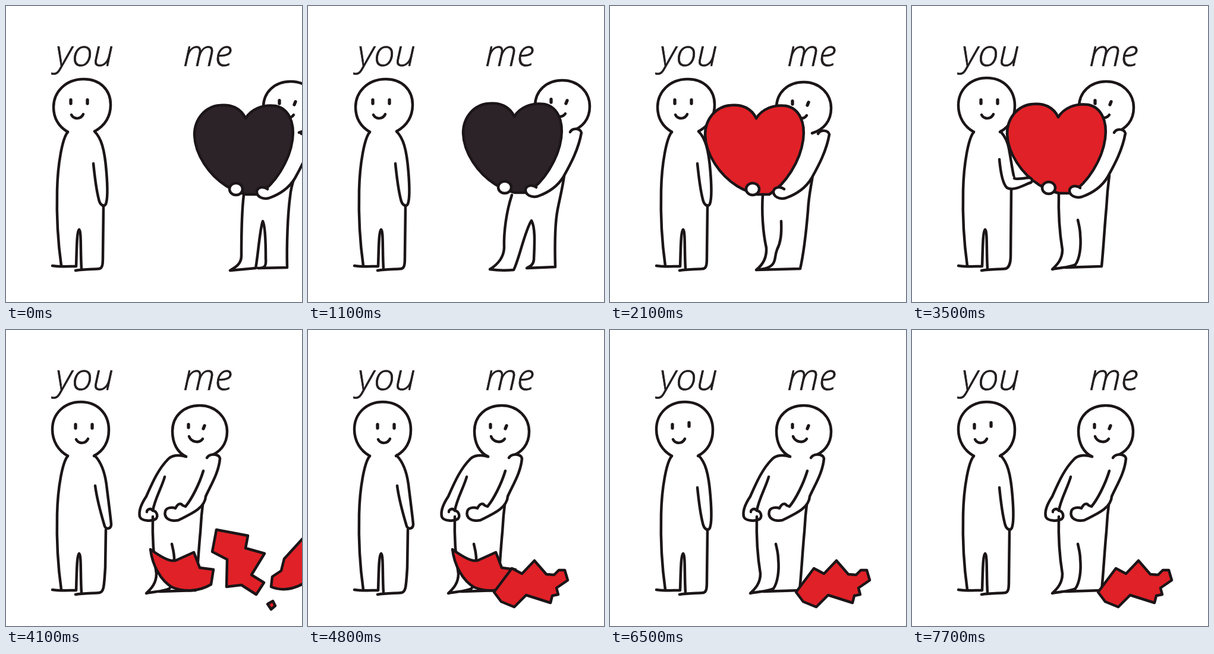
An HTML page that plays this animation: 498 px wide and 498 px high, repeating every 7800 ms.

```html
<!DOCTYPE html>
<html lang="en">
<head>
<meta charset="utf-8">
<title>you and me</title>
<style>
  html, body { margin: 0; width: 100%; height: 100%; overflow: hidden; background: #fff; }
  svg { display: block; width: 498px; height: 498px; }
  text { font: italic 300 63px "Open Sans", "Noto Sans", sans-serif; fill: #211c1f; stroke: #211c1f; stroke-width: .7; }
  path, ellipse { fill: none; stroke: #1b1518; stroke-width: 4.5; stroke-linecap: round; stroke-linejoin: round; }
  .white { fill: #fff; }
  .mask { fill: #fff; stroke: none; }
  .red { fill: #e02127; }
  .dark { fill: #2c2328; }
  .eyes { stroke-width: 5.3; }
</style>
</head>
<body>
<svg id="stage" viewBox="0 0 498 498">
  <text x="83" y="101">you</text>
  <text x="298" y="101">me</text>
</svg>
<script>
const LOOP = 7800, STEP = 100;
const stage = document.getElementById('stage');

const path = (d, cls = '') => `<path class="${cls}" d="${d}"/>`;
const move = (x, y, inner) => `<g transform="translate(${x} ${y})">${inner}</g>`;
const layer = html => {
  const g = document.createElementNS('http://www.w3.org/2000/svg', 'g');
  g.innerHTML = html;
  stage.append(g);
  return g;
};
const layers = poses => Object.fromEntries(Object.entries(poses).map(([k, html]) => [k, layer(html)]));

// --- left figure
const youHead = {
  calm: 'M104 212C89 203 80 190 80 170C80 146 99 123 131 123C158 123 176 141 176 166C176 187 165 202 149 211',
  turned: 'M104 212C88 203 78 187 78 167C78 141 98 121 126 121C154 121 173 141 173 168C173 188 164 203 148 212'
};
const youFace = (x, y, tilt = 0) => move(x, y,
  path(`M109 158v6M137 ${158 + tilt}v6`, 'eyes') + path('M110 183C114 191 126 191 130 182'));
const leftSide = 'M104 212C95 222 87 265 86 310C85 350 87 395 93 437';
const feet = 'M78 437C90 439 105 438 118 438C119 410 119 378 123 376C127 378 125 410 127 443M117 445C130 443 145 443 157 442';
const restArm = 'M149 211C160 222 166 240 169 280C171 305 171 325 168 333C165 339 158 335 156 325C151 305 149 285 147 265';
const flungArm = 'M149 211C160 222 166 238 169 260C172 285 176 315 177 327C177 335 168 336 166 330C160 310 153 285 150 262';
const standing = side => path(leftSide) + path(feet) + path(side);
const restSide = 'M164 336L163 420C163 432 163 441 157 442';
const flungSide = 'M168 336L167 400C165 430 165 441 157 442';
const kickLegs =
  'M104 212C95 222 87 265 87 310C86 340 87 365 88 384' +
  'M172 336C172 360 162 378 145 392C130 402 115 412 101 415C90 405 78 390 70 377C76 386 82 389 87 388C100 380 118 372 122 357' +
  'M88 406L89 436M78 438C90 439 105 438 119 437C121 430 122 420 122 410';

const you = layers({
  rest: path(youHead.calm) + youFace(0, 0) + standing(restSide) + path(restArm),
  look: path(youHead.turned) + youFace(7, 0) + standing(restSide) + path(restArm),
  reach: path(youHead.turned) + youFace(7, 0) +
    standing('M167 308L166 420C166 432 163 441 157 442') +
    path('M149 211C157 220 161 228 163 240C166 255 168 272 172 290'),
  flung: path(youHead.turned) + youFace(8, 1) + standing(flungSide) + path(flungArm),
  kick: path(youHead.turned) + youFace(-4, 1, -3) + path(kickLegs) + path(flungArm),
  away: path(youHead.turned) + youFace(-4, 1, -3) + standing(restSide) + path(restArm)
});

// --- right figure
const heart = 'M246 189C238 172 222 165 203 167C178 169 160 190 160 217C161 250 185 285 214 303C226 310 235 314 247 317L268 317C295 300 320 262 325 225C329 195 318 172 296 168C275 165 255 174 246 189Z';
const meHead = path('M303 213C288 206 280 190 280 170C280 145 299 127 326 127C353 127 372 147 372 171C372 192 360 207 340 213') +
  path('M307 159v5M334 161l-2 5', 'eyes') + path('M308 179C311 188 325 192 331 183');
const holdArm = 'M340 215C345 207 357 209 359 216C354 245 340 270 329 290C318 308 300 318 286 323C275 326 264 321 265 311C268 303 278 304 283 308';
const holding =
  path(holdArm + 'C302 293 322 258 329 225Z', 'mask') + path(holdArm) +
  '<ellipse class="white" cx="230" cy="308" rx="11" ry="10"/>';
const legs = {
  together: 'M243 318C239 350 239 390 239 420C239 435 228 440 220 445L263 441C267 420 270 375 275 362C279 370 280 400 280 425C281 437 279 441 267 441L316 440C315 400 317 350 321 320C323 300 328 290 330 283',
  stride: 'M242 318C233 345 228 380 229 407C228 427 213 438 205 443C218 445 233 445 245 444C254 427 264 377 275 361C282 374 280 402 279 427C278 437 270 439 267 441L315 439C314 402 315 362 319 342C323 322 328 302 330 285',
  step: 'M257 318C255 345 257 380 263 407C264 425 255 437 246 444C258 443 269 441 274 434C279 428 277 420 281 410C287 398 289 385 288 362M246 444L320 442C325 420 330 380 333 345C334 320 339 300 341 285',
  stop: 'M247 314C246 350 248 380 253 410C253 428 242 437 236 443C250 440 265 440 275 435C282 425 285 405 283 385C283 375 280 365 279 360M258 440L319 438C322 410 324 370 327 340C328 320 330 300 332 285'
};
const carry = (x, stance, color, { head = [0, 0], lift = 0, arm = 0 }) =>
  move(x, 0, path(legs[stance]) + move(...head, meHead) +
    move(0, -lift, path(heart, color) + move(arm, 0, holding)));

const me = layers({
  far: carry(157, 'together', 'dark', { head: [-4, 0] }),
  near: carry(101, 'stride', 'dark', { head: [1, -2], lift: 3 }),
  closer: carry(54, 'together', 'dark', { head: [0, -1] }),
  touch: carry(0, 'step', 'red', { head: [0, 1], arm: 10 }),
  give: carry(0, 'stop', 'red', { head: [1, 0], lift: 2 }),
  empty: meHead + path(legs.stop) +
    path('M303 213C290 209 279 211 273 217C255 235 245 260 236 280C228 292 223 305 225 314C228 322 245 322 252 318C257 313 253 304 247 304C243 298 236 303 237 306M267 247C262 265 250 285 247 304') +
    path('M338 215C343 207 358 208 360 216C358 240 345 260 336 280C335 300 310 310 290 320C275 323 265 316 268 305C270 298 280 298 285 300C290 290 295 292 297 295L302 297C312 285 325 260 332 237', 'white')
});
const forearm = layer(path('M147 258C149 280 153 300 160 306C172 312 190 300 200 297C205 294 200 288 196 289C185 290 176 292 172 290', 'white'));

// --- pieces: shape, pivot, keys of [time, dx, dy, turn]; hidden outside its keys
const pieces = [
  { d: 'M243 369C258 380 268 386 278 388L285 388L316 374L326 400L349 403L345 428C325 440 300 441 280 433C260 422 246 395 243 369Z', at: [296, 408],
    keys: [[3800, -40, -140, -30], [4100, 0, 0, 0], [4900, 0, 0, 0], [5300, -150, 0, -90], [5400, -150, 0, -90]] },
  { d: 'M354 336L407 346L403 367L435 376L413 412L434 425L421 445L396 429L371 432L372 386L347 373Z', at: [392, 390],
    keys: [[3800, -125, -130, -60], [4100, 0, 0, 0], [4400, -15, 38, 80]] },
  { d: 'M500 350L468 385L463 405L448 415L446 432C465 440 485 436 505 424L530 380Z', at: [485, 400],
    keys: [[3800, -190, -150, -80], [4100, 0, 0, 0], [4400, 110, 20, 50]] },
  { d: 'M440 461L449 456L453 464L446 470Z', at: [446, 463],
    keys: [[3900, -110, -110, -60], [4100, 0, 0, 0], [4200, 18, 4, 30], [4400, 60, 4, 90]] },
  { d: 'M313 441L343 401L360 410L381 388L401 411L414 412L422 404L432 404L437 421L418 434L421 445L411 447L408 459L367 446L347 466L325 457Z', at: [375, 430],
    keys: [[4400, 0, 0, 0], [LOOP, 0, 0, 0]] },
  { d: 'M-20 320L10 320L14 314L24 320L38 322C42 345 32 375 8 388L-20 395Z', at: [10, 350],
    keys: [[5400, 55, 18, 25], [5500, 0, 0, 0], [5600, -70, -15, -25]] }
];
for (const p of pieces) p.node = layer(path(p.d, 'red'));

const youTimes = [[0, 'rest'], [2800, 'look'], [3200, 'reach'], [3800, 'flung'], [5400, 'kick'], [6000, 'away']];
const meTimes = [[0, 'far'], [700, 'near'], [1400, 'closer'], [2000, 'touch'], [2800, 'give'], [3800, 'empty']];

const poseAt = (times, t) => times.filter(([start]) => start <= t).pop()[1];
const show = (node, on) => { node.style.display = on ? '' : 'none'; };
const showOnly = (set, name) => Object.keys(set).forEach(k => show(set[k], k === name));

function place({ node, keys, at }, t) {
  const i = keys.findIndex((k, n) => n + 1 < keys.length && t >= k[0] && t < keys[n + 1][0]);
  show(node, i >= 0);
  if (i < 0) return;
  const [a, b] = [keys[i], keys[i + 1]];
  const f = (t - a[0]) / (b[0] - a[0]);
  const [, x, y, turn] = a.map((v, n) => v + (b[n] - v) * f);
  node.setAttribute('transform', `translate(${x} ${y}) rotate(${turn} ${at})`);
}

function draw(time) {
  const t = Math.floor((time % LOOP) / STEP) * STEP;
  const pose = poseAt(youTimes, t);
  showOnly(you, pose);
  showOnly(me, poseAt(meTimes, t));
  show(forearm, pose === 'reach');
  pieces.forEach(p => place(p, t));
}

const start = performance.now();
function tick() {
  draw(performance.now() - start);
  requestAnimationFrame(tick);
}
tick();
</script>
</body>
</html>
```
